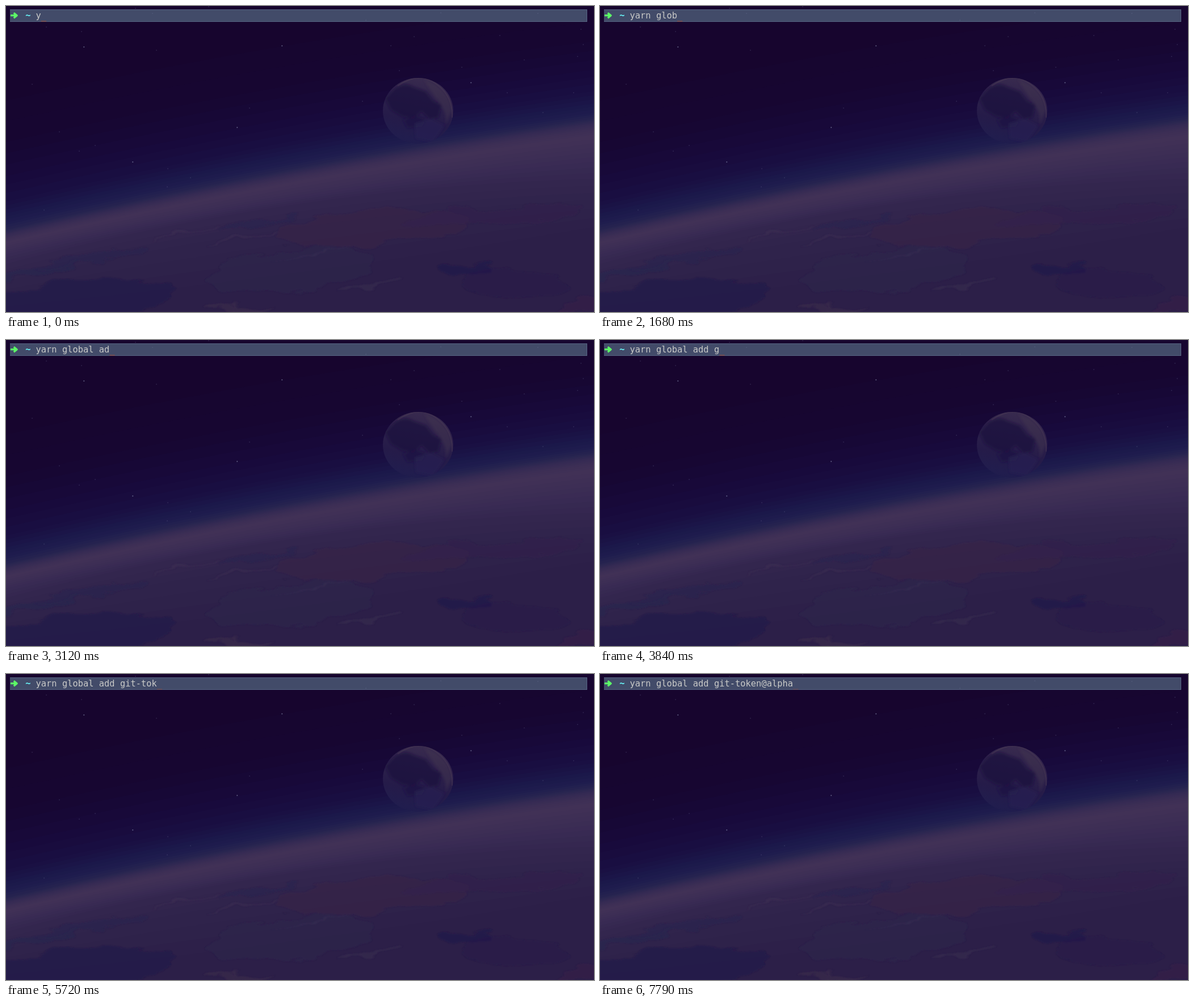
These frames come from a looping animation (1036 by 540 pixels, 8 s). An HTML page:

```html
<!DOCTYPE html>
<html lang="en">
<head>
<meta charset="utf-8">
<title>Terminal</title>
<style>
html, body { margin: 0; width: 100%; height: 100%; overflow: hidden; background: #17052e; }
svg { display: block; width: 1036px; height: 540px; }
text { font: 15.42px "DejaVu Sans Mono", monospace; white-space: pre; }
</style>
</head>
<body>
<svg viewBox="0 0 1036 540" xmlns="http://www.w3.org/2000/svg">
  <defs>
    <filter id="ragged" x="-10%" y="-20%" width="120%" height="140%">
      <feTurbulence type="fractalNoise" baseFrequency=".012 .04" numOctaves="3" seed="4"/>
      <feDisplacementMap in="SourceGraphic" scale="34" xChannelSelector="R" yChannelSelector="G"/>
      <feGaussianBlur stdDeviation=".8"/>
    </filter>
    <filter id="soft" x="-20%" y="-20%" width="140%" height="140%"><feGaussianBlur stdDeviation="2"/></filter>
    <linearGradient id="moonFill" x1=".65" y1="0" x2=".45" y2="1">
      <stop offset="0" stop-color="#3b2d50"/>
      <stop offset=".3" stop-color="#30234b"/>
      <stop offset=".65" stop-color="#251b49"/>
      <stop offset=".9" stop-color="#211d4e"/>
      <stop offset="1" stop-color="#1e1c4c"/>
    </linearGradient>
    <clipPath id="moonClip"><ellipse cx="726" cy="185" rx="62" ry="58"/></clipPath>
  </defs>
  <rect width="1036" height="540" fill="#17052e"/>
  <g id="bands"></g>
  <g id="clouds" filter="url(#ragged)"></g>
  <g clip-path="url(#moonClip)">
    <rect x="660" y="120" width="132" height="130" fill="url(#moonFill)"/>
    <g filter="url(#soft)">
      <path d="M684 146q18 -13 34 -3l22 8 12 16 15 8 -5 22 -17 2 -13 -13 -14 13 -20 -4 -20 -12 -10 -20z" fill="#1e103f" opacity=".75"/>
      <path d="M700 201l22 -8 18 8 -8 12 -25 2z" fill="#201545" opacity=".7"/>
      <path d="M736 130q46 15 49 55l-10 25q2 -29 -18 -48z" fill="#45354f" opacity=".4"/>
      <path d="M720 207l28 -8 25 12 -21 29 -30 -6z" fill="#2b2253" opacity=".6"/>
    </g>
    <path d="M690 141Q728 115 757 137Q788 158 786 197" fill="none" stroke="#4b3a54" stroke-width="2" opacity=".5"/>
  </g>
  <rect x="7" y="6" width="1017" height="22" fill="#424b69"/>
  <path d="M7 6.5H1024M7 27.5H1024M1023.5 6V28" stroke="#566482" fill="none"/>
  <g id="stars"></g>
  <path d="M8 16.7H15M13.7 12.2L19.2 16.7L13.7 21.2" fill="none" stroke="#5cf967" stroke-width="3.3" stroke-linejoin="round"/>
  <path d="M14 12L20 16.7L14 21.5Z" fill="#5cf967"/>
  <text x="34.2" y="22" fill="#68f3f6" font-weight="bold" style="font-weight:bold">~</text>
  <text id="command" x="52.5" y="22" fill="#c9cac8"></text>
  <rect id="cursor" y="26" width="9.3" height="1.6" fill="#b84a28"/>
</svg>
<script>
const $ = id => document.getElementById(id);
const add = (parent, tag, attrs) => {
  const el = document.createElementNS("http://www.w3.org/2000/svg", tag);
  for (const name in attrs) el.setAttribute(name, attrs[name]);
  parent.append(el);
};

// Height at the left edge, centre and right edge, then the colour below that curve.
const stops = [
  [130, 30, -40, "#17052e"],
  [240, 137, 62, "#170733"],
  [300, 195, 112, "#180a3c"],
  [345, 236, 150, "#1a1043"],
  [366, 257, 172, "#1b184a"],
  [382, 273, 188, "#1f1d4e"],
  [395, 285, 199, "#282550"],
  [402, 293, 207, "#342a53"],
  [409, 300, 216, "#3c2e55"],
  [416, 308, 227, "#413156"],
  [427, 325, 250, "#3d2e55"],
  [438, 338, 275, "#382a53"],
  [455, 349, 305, "#33264e"],
  [485, 390, 342, "#2f234b"],
  [530, 470, 390, "#2c1f48"]
];
const channels = hex => [1, 3, 5].map(i => parseInt(hex.slice(i, i + 2), 16));
const mix = (a, b, k) => a + (b - a) * k;

function drawBands() {
  const parts = 3;
  for (let i = 0; i < stops.length - 1; i++) {
    const from = stops[i], to = stops[i + 1];
    const a = channels(from[3]), b = channels(to[3]);
    for (let j = 1; j <= parts; j++) {
      const k = j / parts;
      const [left, mid, right] = [0, 1, 2].map(n => mix(from[n], to[n], k));
      const bend = 2 * mid - (left + right) / 2;
      add($("bands"), "path", {
        d: `M0 ${left}Q518 ${bend} 1036 ${right}V540H0Z`,
        fill: `rgb(${a.map((v, n) => Math.round(mix(v, b[n], k)))})`
      });
    }
  }
}

function drawClouds() {
  const patches = [
    [650, 392, 170, 30, -4, "#3a1f48", .45],
    [860, 370, 160, 16, -4, "#33224b", .6],
    [500, 465, 150, 38, -6, "#2c264c", .6],
    [130, 520, 175, 34, -5, "#21194a", .75],
    [150, 445, 100, 8, -9, "#29264f", .7],
    [40, 470, 90, 6, -9, "#29264f", .6],
    [445, 384, 70, 5, -8, "#292651", .7],
    [815, 462, 45, 10, 3, "#231a4b", .8],
    [900, 490, 95, 28, 4, "#271b49", .7],
    [320, 400, 60, 2, -13, "#3d2f52", .6],
    [425, 408, 65, 2, -12, "#3d2f52", .6],
    [540, 437, 70, 2, -10, "#382b50", .6],
    [640, 494, 55, 3, -8, "#382c50", .6],
    [410, 530, 65, 3, -4, "#3b2c4c", .6],
    [1020, 528, 45, 9, -8, "#38204a", .6]
  ];
  for (const [x, y, rx, ry, angle, fill, opacity] of patches)
    add($("clouds"), "ellipse", { cx: x, cy: y, rx, ry, fill, opacity, transform: `rotate(${angle} ${x} ${y})` });
}

function drawStars() {
  const places = "133,45 137,72 265,78 486,70 46,138 407,214 429,180 223,275 129,256 157,246 285,287 " +
    "94,222 819,135 803,108 870,52 693,114 1017,68 1007,89 1000,153 228,4 357,1 284,319 67,360 " +
    "325,303 946,188 913,95 628,168 678,70 719,54 71,37 883,153 1013,41 258,13 634,25 766,12 937,13";
  const bright = [1, 3, 5, 7, 12];
  places.split(" ").forEach((place, i) => {
    const [x, y] = place.split(",");
    const size = bright.includes(i) ? 1.7 : 1.2;
    add($("stars"), "rect", {
      x: x - .5, y: y - .5, width: size, height: size,
      fill: "#7d82a5", opacity: bright.includes(i) ? .8 : .45
    });
  });
}

const command = "yarn global add git-token@alpha";
const keyTimes = [
  500, 650, 820, 970, 1210, 1350, 1500, 1680, 1980, 2100, 2400,
  2850, 3120, 3300, 3480, 3840, 4020, 4290, 4550, 4820, 5360, 5720,
  6170, 6260, 7070, 7340, 7520, 7520, 7790, 7790
];
const duration = 8000, cellWidth = 9.28;

function cursorLevel(t) {
  if (t < 230) return .5;
  if (t < 500) return .3;
  return t < 4000 ? .5 : t < 7000 ? .35 : .25;
}

function render(t) {
  const typed = 1 + keyTimes.filter(time => time <= t).length;
  $("command").textContent = command.slice(0, typed);
  $("cursor").setAttribute("x", 52.5 + typed * cellWidth);
  $("cursor").setAttribute("opacity", cursorLevel(t));
}

drawBands();
drawClouds();
drawStars();

const start = performance.now();
function tick() {
  render((performance.now() - start) % duration);
  requestAnimationFrame(tick);
}
tick();
</script>
</body>
</html>
```
